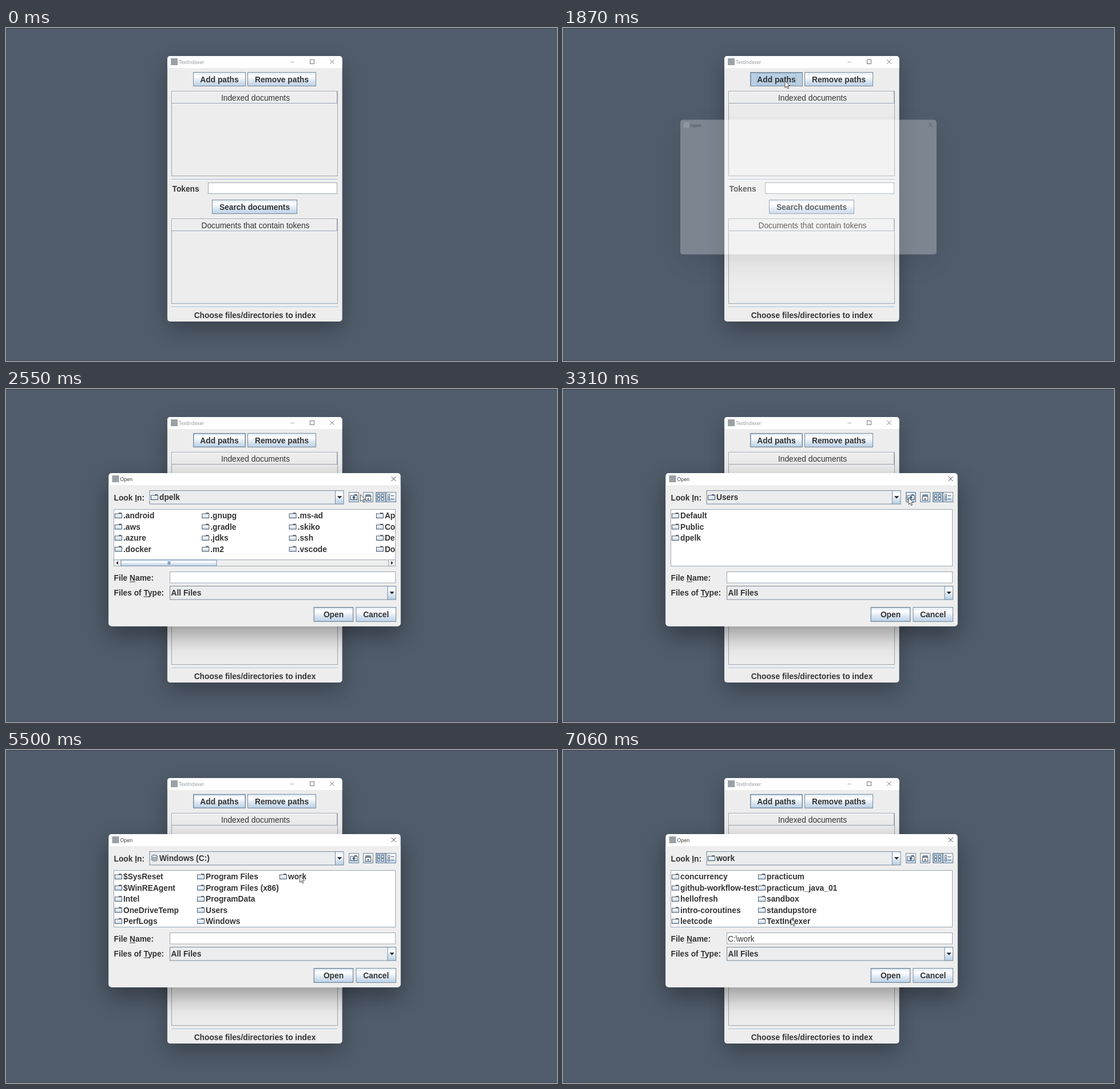
An HTML page with a canvas that plays this animation: 963 by 582 pixels, repeating every 8 s.

```html
<!DOCTYPE html>
<html lang="en">
<head>
<meta charset="utf-8">
<title>TextIndexer</title>
<style>
  html, body { margin: 0; width: 100%; height: 100%; overflow: hidden; background: #505c6b; }
  canvas { display: block; }
</style>
</head>
<body>
<canvas id="stage" width="963" height="582"></canvas>
<script>
const ctx = document.getElementById('stage').getContext('2d');
const LOOP = 8000;
const INK = '#333', EDGE = '#7a8a99', LINE = '#9aa6b1', SOFT = '#b8cfe5', PANEL = '#eee';
const SANS = '"Liberation Sans", Arial, sans-serif';
const CAPTION = '"Open Sans", "Noto Sans", sans-serif';

const FOLDERS = {
  home: { pitch: 152.3, rows: 4, names: ['.android', '.aws', '.azure', '.docker', '.gnupg', '.gradle', '.jdks', '.m2',
    '.ms-ad', '.skiko', '.ssh', '.vscode', 'AppData', 'Contacts', 'Desktop', 'Documents'] },
  users: { pitch: 150, rows: 5, names: ['Default', 'Public', 'dpelk'] },
  drive: { pitch: 144, rows: 5, names: ['$SysReset', '$WinREAgent', 'Intel', 'OneDriveTemp', 'PerfLogs',
    'Program Files', 'Program Files (x86)', 'ProgramData', 'Users', 'Windows', 'work'] },
  work: { pitch: 151, rows: 5, names: ['concurrency', 'github-workflow-test', 'hellofresh', 'intro-coroutines', 'leetcode',
    'practicum', 'practicum_java_01', 'sandbox', 'standupstore', 'TextIndexer'] }
};

// Pointer moves: begin, end, steps, x, y, eased
const MOVES = [
  [70, 210, 3, 507, 222, false],
  [450, 915, 7, 388, 92.5, true],
  [2170, 2620, 7, 633, 190, true],
  [2680, 2750, 2, 604, 190, false],
  [4760, 5204, 7, 498, 240, true],
  [5278, 5500, 4, 513.5, 219.5, true],
  [6460, 7060, 10, 398.5, 294.5, true]
];

// Latest value whose time has come
function at(t, list) {
  let value;
  for (const [time, v] of list) if (t >= time) value = v;
  return value;
}

const between = (t, a, b) => t >= a && t < b;

function fill(color, x, y, w, h) {
  ctx.fillStyle = color;
  ctx.fillRect(x, y, w, h);
}

function frame(color, x, y, w, h, width = 1) {
  ctx.strokeStyle = color;
  ctx.lineWidth = width;
  ctx.strokeRect(x, y, w, h);
}

function poly(points, color) {
  ctx.beginPath();
  points.forEach(([x, y]) => ctx.lineTo(x, y));
  ctx.closePath();
  ctx.fillStyle = color;
  ctx.fill();
}

function lines(color, width, ...segments) {
  ctx.strokeStyle = color;
  ctx.lineWidth = width;
  ctx.beginPath();
  for (const [x1, y1, x2, y2] of segments) {
    ctx.moveTo(x1, y1);
    ctx.lineTo(x2, y2);
  }
  ctx.stroke();
}

function text(s, x, y, { weight = 'bold', size = 13.78, font = SANS, color = INK, align = 'left' } = {}) {
  ctx.font = `${weight} ${size}px ${font}`;
  ctx.textAlign = align;
  ctx.fillStyle = color;
  ctx.fillText(s, x, y);
}

// Label with one underlined letter
function mnemonic(s, index, x, y) {
  text(s, x, y);
  const left = ctx.measureText(s.slice(0, index)).width;
  fill(INK, x + left, y + 1.5, ctx.measureText(s[index]).width, 1);
}

function steel(y, h) {
  const g = ctx.createLinearGradient(0, y, 0, y + h);
  g.addColorStop(0, '#dde8f3');
  g.addColorStop(0.3, '#fff');
  g.addColorStop(0.6, '#dde8f3');
  g.addColorStop(1, SOFT);
  return g;
}

function button(label, x, y, w, h, { over, down, focus } = {}) {
  fill(down ? SOFT : steel(y, h), x, y, w, h);
  if (over) frame('#a3bcd4', x + 1.5, y + 1.5, w - 3, h - 3);
  if (down) lines('#8ea5bc', 1, [x + 1.5, y + h - 1, x + 1.5, y + 1], [x + 1, y + 1.5, x + w - 1, y + 1.5]);
  frame(EDGE, x + 0.5, y + 0.5, w - 1, h - 1);
  const mid = x + w / 2;
  if (focus) frame('#a3b8cc', mid - 34, y + 2.5, 68, h - 5);
  if (label) text(label, mid, y + h / 2 + 5, { align: 'center' });
}

// Rounded panel whose shadow falls only outside it
function card(x, y, w, h, color, blur, drop, shade) {
  const shape = new Path2D();
  shape.roundRect(x, y, w, h, 5);
  const outside = new Path2D(shape);
  outside.rect(-200, -200, 1400, 1000);
  ctx.save();
  ctx.clip(outside, 'evenodd');
  ctx.shadowColor = `rgba(0,0,0,${shade})`;
  ctx.shadowBlur = blur;
  ctx.shadowOffsetY = drop;
  ctx.fillStyle = color;
  ctx.fill(shape);
  ctx.restore();
  ctx.fillStyle = color;
  ctx.fill(shape);
}

const cross = (x, y, r, color) => lines(color, 0.9, [x - r, y - r, x + r, y + r], [x - r, y + r, x + r, y - r]);

function table(title, y) {
  frame(LINE, 289.5, y + 0.5, 290, 148);
  lines('#fff', 1, [290.5, y + 21, 290.5, y + 1], [290, y + 1.5, 578, y + 1.5]);
  lines(LINE, 1, [290, y + 21.5, 579, y + 21.5], [578.5, y + 1, 578.5, y + 21]);
  text(title, 436, y + 16.7, { weight: 'normal', align: 'center' });
}

function rule(y) {
  fill('#9db5cd', 289, y, 291, 1);
  fill('#fff', 289, y + 1, 291, 1);
}

function mainWindow(t) {
  const active = between(t, 992, 1870);
  const tone = active ? '#222' : '#8c9398';
  card(282, 49, 305.5, 464, '#ededed', active ? 44 : 36, active ? 18 : 14, active ? 0.38 : 0.28);
  ctx.fillStyle = '#fff';
  ctx.beginPath();
  ctx.roundRect(282, 49, 305.5, 21, [5, 5, 0, 0]);
  ctx.fill();
  fill('#9aa1a6', 288, 53, 12, 12);
  text('TextIndexer', 302, 62.7, { weight: 'normal', size: 8.2, font: CAPTION, color: tone });
  lines(active ? '#333' : '#b0b0b0', 1, [497, 59.5, 504, 59.5]);
  frame(active ? '#333' : '#777', 531.5, 55.5, 7, 7);
  cross(570, 59, 3.8, active ? '#333' : '#777');

  const down = between(t, 992, 2020);
  button('Add paths', 327, 77, 92, 25, { down, focus: down, over: t >= 2020 });
  button('Remove paths', 422, 77, 120, 25);
  table('Indexed documents', 110);
  rule(264);
  text('Tokens', 290.5, 285.8);
  fill('#fff', 353, 270, 226, 20);
  frame(LINE, 353.5, 270.5, 225, 19);
  button('Search documents', 360, 300, 149, 25);
  table('Documents that contain tokens', 333);
  rule(487);
  text('Choose files/directories to index', 435, 507.3, { align: 'center' });
}

function folderIcon(x, y) {
  const g = ctx.createLinearGradient(0, y, 0, y + 10);
  g.addColorStop(0.2, '#fff');
  g.addColorStop(1, '#c4d8ec');
  fill('#5d6f85', x + 7, y, 5, 2);
  fill(g, x + 0.5, y + 2, 12, 8);
  frame('#3c4654', x + 0.5, y + 2, 12, 7.5, 0.9);
}

function diskIcon(x, y) {
  for (let i = 2; i >= 0; i--) {
    ctx.beginPath();
    ctx.ellipse(x + 5.5, y + 3 + i * 2.8, 5, 2.3, 0, 0, 7);
    ctx.fillStyle = '#dbe3ea';
    ctx.fill();
    ctx.strokeStyle = '#3c4654';
    ctx.lineWidth = 0.9;
    ctx.stroke();
  }
}

function combo(label, x, y, w, split, textX) {
  fill('#eaecee', x, y, w, 24.5);
  fill(steel(y, 24), split, y, x + w - split, 24.5);
  frame(EDGE, x + 0.5, y + 0.5, w - 1, 23.5);
  lines(EDGE, 1, [split + 0.5, y, split + 0.5, y + 24]);
  const mid = (split + x + w) / 2 + 0.3;
  poly([[mid - 4.2, y + 10.3], [mid + 4.2, y + 10.3], [mid, y + 14.5]], '#222');
  text(label, textX, y + 17.2);
}

function toolbar(t) {
  const down = between(t, 2950, 3094) || between(t, 4160, 4340);
  button('', 599, 180, 18, 18, { down, over: between(t, 2750, 4834) });
  folderIcon(601.5, 184);
  poly([[608, 186.5], [611, 190], [609, 190], [609, 192.5], [607, 192.5], [607, 190], [605, 190]], '#33506e');
  button('', 624, 180, 18, 18);
  poly([[627, 187.5], [629, 184], [637, 184], [639, 187.5]], '#7d91a6');
  fill('#fff', 628.5, 187.5, 9, 7);
  frame('#444', 628.5, 187.5, 9, 7, 0.9);
  fill('#7d91a6', 631.5, 190, 3, 4.5);
  button('', 646, 180, 18, 18, { down: true });
  button('', 664, 180, 18, 18);
  for (const dy of [184, 190]) {
    for (const x of [649.5, 656.5]) {
      fill('#eaf1f8', x, dy, 3.5, 4.5);
      frame('#4a5b70', x, dy, 3.5, 4.5, 0.9);
    }
    frame('#4a5b70', 667.5, dy, 3, 4, 0.9);
    fill('#4a5b70', 672.5, dy + 2, 6, 1);
  }
}

function fileList({ names, pitch, rows }, selected) {
  fill('#fff', 188, 210, 493, 100);
  ctx.save();
  ctx.beginPath();
  ctx.rect(189, 211, 491, 98);
  ctx.clip();
  names.forEach((name, i) => {
    const x = 190 + Math.floor(i / rows) * pitch;
    const y = 216 + (i % rows) * 19.45;
    if (name === selected) {
      fill(SOFT, x - 1, y - 4.5, 52, 19);
      frame('#6382bf', x - 0.5, y - 4, 51, 18);
    }
    folderIcon(x, y);
    text(name, x + 15, y + 10.2);
  });
  ctx.restore();
  if (rows === 4) scrollBar();
  frame(LINE, 188.5, 210.5, 492, 99);
}

function scrollBar() {
  fill(PANEL, 189, 298.5, 491, 11);
  lines(LINE, 1, [189, 298.5, 680, 298.5]);
  fill(steel(299, 10), 201, 299, 167, 10);
  frame('#6382bf', 201, 298.8, 167, 10.4, 0.9);
  fill('#86a8cc', 282.5, 301, 5, 6);
  lines(LINE, 1, [200.5, 299, 200.5, 309], [668.5, 299, 668.5, 309]);
  poly([[196, 301], [196, 307], [192.5, 304]], '#222');
  poly([[673, 301], [673, 307], [676.5, 304]], '#222');
}

function dialogBody(t) {
  ctx.fillStyle = PANEL;
  ctx.beginPath();
  ctx.roundRect(179.5, 168, 510, 246.5, [0, 0, 5, 5]);
  ctx.fill();

  const place = at(t, [[0, 'dpelk'], [3022, 'Users'], [4250, 'Windows (C:)'], [5980, 'work']]);
  const list = at(t, [[0, 'home'], [3094, 'users'], [4340, 'drive'], [5980, 'work']]);
  const file = at(t, [[0, ''], [5570, 'work'], [5980, 'C:\\work']]);

  mnemonic('Look In:', 5, 188.5, 194.5);
  combo(place, 250.5, 177, 340, 575, 268);
  if (place === 'Windows (C:)') diskIcon(254, 183);
  else folderIcon(253, 184);
  toolbar(t);
  fileList(FOLDERS[list], between(t, 5570, 5980) ? 'work' : null);

  mnemonic('File Name:', 5, 188.5, 335);
  fill('#fff', 286, 319, 394.5, 20.5);
  frame(LINE, 286.5, 319.5, 394, 19.5);
  if (t < 2520) fill(EDGE, 287.5, 321, 1, 16);
  text(file, 288, 335, { weight: 'normal' });
  mnemonic('Files of Type:', 9, 188.5, 361);
  combo('All Files', 286, 344, 396, 666.5, 288.5);
  button('Open', 537.5, 381, 70, 26, { over: true });
  button('Cancel', 611.5, 381, 70.5, 26);
}

function dialog(t) {
  if (t < 1870) return;
  // Opening runs on the same 75 ms beat as the pointer
  const age = Math.floor((t - 1870) / 75 + 1e-6) * 75;
  const left = age > 300 ? 0 : Math.exp(-age / 65);
  const scale = 1 - 0.122 * left;
  const alpha = at(age, [[0, 0.25], [75, 0.75], [150, 1]]);
  ctx.save();
  ctx.translate(434.5 - 5.6 * left, 280.7 - 2.7 * left);
  ctx.scale(scale, scale);
  ctx.translate(-434.5, -280.7);
  ctx.globalAlpha = alpha;
  card(179.5, 147, 510, 267.5, '#fff', 42, 16, 0.38);
  ctx.globalAlpha = Math.max(alpha, 0.6);
  fill('#9aa1a6', 185.5, 151, 12, 12);
  text('Open', 199.5, 160.6, { weight: 'normal', size: 8.5, font: CAPTION, color: '#222' });
  cross(677.5, 157, 4, '#333');
  ctx.globalAlpha = 1;
  if (age >= 150) dialogBody(t);
  ctx.restore();
}

function pointerAt(t) {
  let x = 787.5, y = 555;
  for (const [begin, end, n, toX, toY, eased] of MOVES) {
    if (t < begin) break;
    const k = Math.floor((t - begin) * (n - 1) / (end - begin) + 1e-6);
    let p = Math.min(1, (k + 1) / n);
    if (eased) p = p * p * (3 - 2 * p);
    x += (toX - x) * p;
    y += (toY - y) * p;
  }
  return [x, y];
}

function busyRing(t) {
  const turn = t < 5840 ? -1.2 : 0.3;
  ctx.lineWidth = 3;
  ctx.strokeStyle = '#9fd3f5';
  ctx.beginPath();
  ctx.arc(513, 220, 7, 0, 7);
  ctx.stroke();
  ctx.strokeStyle = '#1a7fd0';
  ctx.beginPath();
  ctx.arc(513, 220, 7, turn, turn + 2.2);
  ctx.stroke();
}

function pointer(t) {
  if (t < 70) return;
  if (between(t, 5790, 5980)) return busyRing(t);
  const [x, y] = pointerAt(t);
  ctx.save();
  ctx.translate(x, y);
  poly([[0, 0], [0, 11.8], [2.7, 9.3], [4.5, 13.4], [6.4, 12.6], [4.6, 8.6], [8.3, 8.6]], '#fff');
  ctx.strokeStyle = '#222';
  ctx.lineWidth = 0.8;
  ctx.stroke();
  ctx.restore();
}

function draw(t) {
  fill('#505c6b', 0, 0, 963, 582);
  fill('#3d4753', 0, 0, 963, 1);
  fill('#444f5c', 0, 581, 963, 1);
  mainWindow(t);
  dialog(t);
  pointer(t);
}

const start = performance.now();
function tick() {
  draw((performance.now() - start) % LOOP);
  requestAnimationFrame(tick);
}
tick();
</script>
</body>
</html>
```
